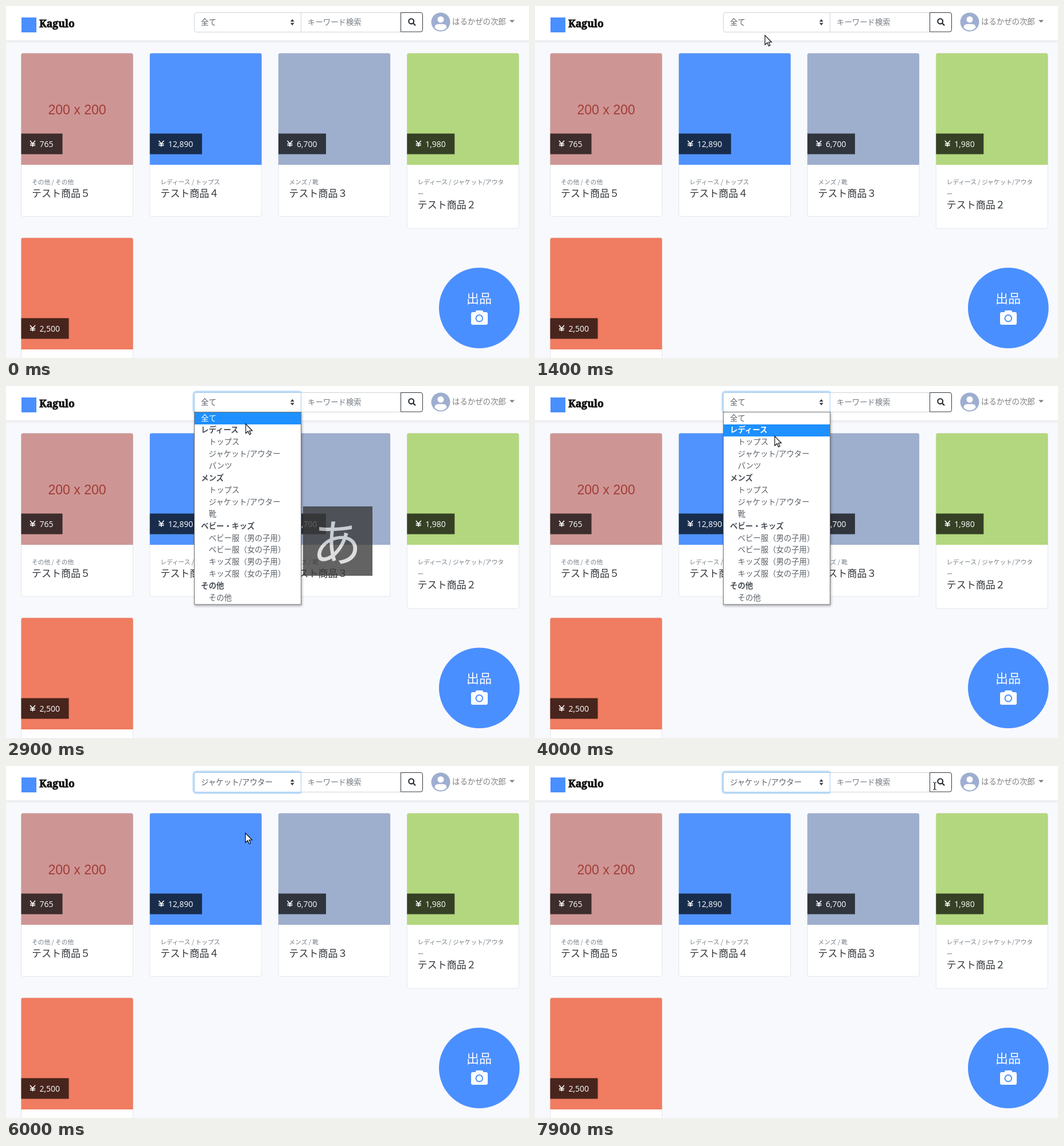
An HTML page that plays this animation: 912x614 px, repeating every 8000 ms.

```html
<!DOCTYPE html>
<html lang="ja">
<head>
<meta charset="utf-8">
<title>Shop search</title>
<style>
  html, body { margin: 0; width: 100%; height: 100%; overflow: hidden; background: #f8f9fd; }
  svg { display: block; }
  text { font-family: "Noto Sans CJK JP", "Noto Sans CJK", sans-serif; font-weight: 300; white-space: pre; }
  .ui { font-size: 13.4px; fill: #5a6067; }
  .group { font-weight: 700; fill: #495057; }
  .muted { fill: #757d84; }
  .category { font-size: 10.7px; fill: #757d84; }
  .title { font-size: 17px; fill: #32363a; }
  .price { font: 400 14px "Open Sans", sans-serif; fill: #fff; }
  .size { font: 23px "Liberation Sans", sans-serif; fill: #a43c36; }
  .brand { font: 900 17.5px "Noto Serif", serif; fill: #111; stroke: #111; stroke-width: .8; }
  .ime { font-size: 87px; fill: #d5d5d5; }
  .status { font: 11px "Open Sans", sans-serif; fill: #5f6368; }
</style>
</head>
<body>
<script>
const LOOP = 8000, STEP = 100, ROW = 20.9, MENU_TOP = 46;
const OPEN = 2300, CLOSE = 5900;

const cards = [
  { x: 26.5, y: 82.5, h: 284.5, color: '#cd9695', price: '765', tag: 72, category: ['その他 / その他'], title: 'テスト商品５' },
  { x: 250.8, y: 82.5, h: 284.5, color: '#5093ff', price: '12,890', tag: 91, category: ['レディース / トップス'], title: 'テスト商品４' },
  { x: 475, y: 82.5, h: 284.5, color: '#9eaecd', price: '6,700', tag: 83, category: ['メンズ / 靴'], title: 'テスト商品３' },
  { x: 699.3, y: 82.5, h: 305.5, color: '#b3d77e', price: '1,980', tag: 83, category: ['レディース / ジャケット/アウタ', 'ー'], title: 'テスト商品２' },
  { x: 26.5, y: 404.5, h: 284.5, color: '#f07c61', price: '2,500', tag: 83, category: [], title: '' },
];

// A leading * marks a group heading.
const options = ['全て', '*レディース', 'トップス', 'ジャケット/アウター', 'パンツ', '*メンズ', 'トップス',
  'ジャケット/アウター', '靴', '*ベビー・キッズ', 'ベビー服（男の子用）', 'ベビー服（女の子用）',
  'キッズ服（男の子用）', 'キッズ服（女の子用）', '*その他', 'その他'];

const text = (x, y, cls, content, extra = '') => `<text x="${x}" y="${y}" class="${cls}" ${extra}>${content}</text>`;
const rect = (x, y, w, h, fill, extra = '') => `<rect x="${x}" y="${y}" width="${w}" height="${h}" fill="${fill}" ${extra}/>`;

const yen = (x, y) => `<path d="M${x} ${y}l4.5 5l4.5 -5m-4.5 5v5.5m-4.5 -5h9m-9 2.8h9" fill="none" stroke="#fff" stroke-width="1.6"/>`;

function card({ x, y, h, color, price, tag, category, title }) {
  const lines = category.map((line, i) => text(x + 18.5, y + 228.5 + i * ROW, 'category', line)).join('');
  const titleY = y + 250 + (category.length - 1) * ROW;
  return `<g>
    ${rect(x, y, 195, h, '#fff', 'rx="3" stroke="#e3e5e9"')}
    <path d="M${x} ${y + 194.5}v-191.5q0 -3 3 -3h189q3 0 3 3v191.5z" fill="${color}"/>
    ${rect(x, y + 140, tag, 36, '#000', 'opacity=".7"')}
    ${yen(x + 15.5, y + 152.5)}
    ${text(x + 32, y + 163, 'price', price)}
    ${lines}${text(x + 18.5, titleY, 'title', title)}
  </g>`;
}

function header() {
  return `
    ${rect(-10, -10, 932, 70, '#fff', 'filter="url(#soft)"')}
    ${rect(27, 20, 26, 26, '#4a8fff')}
    ${text(58, 36.5, 'brand', 'Kagulo')}
    ${rect(326.8, 9.8, 189.4, 37.4, 'none', 'id="ring" rx="5" stroke="#bfdcf5" stroke-width="3"')}
    <path d="M514.5 11.5h174v34h-174z" fill="#fff" stroke="#ced4da"/>
    <path id="select" d="M514.5 11.5h-182.5q-3.5 0 -3.5 3.5v27q0 3.5 3.5 3.5h182.5z" fill="#fff"/>
    <path d="M495.8 27.2l3.5 -4.2l3.5 4.2zm0 2.3l3.5 4.2l3.5 -4.2z" fill="#343a40"/>
    ${text(340, 33, 'ui', '', 'id="choice"')}
    ${text(526, 33, 'ui muted', 'キーワード検索')}
    <path d="M688.5 11.5h34.5q3.5 0 3.5 3.5v26.5q0 3.5 -3.5 3.5h-34.5z" fill="#fff" stroke="#343a40"/>
    <g fill="none" stroke="#23272b" stroke-width="2.1"><circle cx="706.7" cy="26.7" r="4.4"/><path d="M710 30l4 4"/></g>
    <circle cx="758" cy="28" r="16.5" fill="#9eaed0"/>
    <path d="M747.5 37.5q0 -6 6.5 -6h8q6.5 0 6.5 6a13.5 13.5 0 0 1 -21 0z" fill="#fff"/>
    <circle cx="758" cy="23.5" r="5.5" fill="#fff"/>
    ${text(778, 31.8, 'ui', 'はるかぜの次郎', 'style="fill:#7f7f7f"')}
    <path d="M878 24.5h9l-4.5 4.5z" fill="#7f7f7f"/>`;
}

function sellButton() {
  return `
    <circle cx="825.3" cy="526.8" r="70.3" fill="#4a8fff"/>
    ${text(803, 517.5, 'ui', '出品', 'style="font-size:22px;fill:#fff"')}
    <path d="M814 534h4.5l1.5 -3h11l1.5 3h4.5q3 0 3 3v16q0 3 -3 3h-23q-3 0 -3 -3v-16q0 -3 3 -3z" fill="#fff"/>
    <circle cx="825.3" cy="544.8" r="5.8" fill="none" stroke="#4a8fff" stroke-width="2"/>`;
}

function menu() {
  const items = options.map((label, i) => {
    const group = label[0] === '*';
    const inset = group || i === 0 ? 340 : 353.5;
    return text(inset, 60.5 + i * ROW, group ? 'ui group' : 'ui', label.replace('*', ''));
  }).join('');
  return `<g id="menu">
    ${rect(328.5, 45.5, 186, 335.5, '#fff', 'stroke="#777" filter="url(#drop)"')}
    ${rect(329, 0, 185, 21, '#1e90ff', 'id="highlight"')}
    ${items}
  </g>`;
}

document.body.innerHTML = `<svg width="912" height="614" viewBox="0 0 912 614">
  <defs>
    <filter id="soft" x="-5%" y="-20%" width="110%" height="140%"><feDropShadow dx="0" dy="2" stdDeviation="2" flood-opacity=".08"/></filter>
    <filter id="drop"><feDropShadow dx="1" dy="2" stdDeviation="2" flood-opacity=".35"/></filter>
  </defs>
  ${rect(0, 0, 912, 614, '#f8f9fd')}
  ${cards.map(card).join('')}
  ${text(124, 188.5, 'size', '200 x 200', 'text-anchor="middle"')}
  ${header()}
  ${sellButton()}
  <g id="ime">${rect(518, 210, 121, 121, '#383838')}${text(533.5, 305.5, 'ime', 'あ')}</g>
  ${menu()}
  <g id="status">
    ${rect(-4, 604, 128.5, 20, '#dee1e6', 'rx="3" stroke="#cfd2d6"')}
    ${text(-2, 618.5, 'status', '192.168.99.100/items/3')}
  </g>
  <path id="arrow" d="M0 0V16.5L4 13L6.5 18.8L9 17.7L6.5 12H11.5Z" fill="#fff" stroke="#000" stroke-width="1.1"/>
  <path id="beam" d="M-3 -6.5q3 0 3 2v9q0 2 -3 2M3 -6.5q-3 0 -3 2v9q0 2 3 2" fill="none" stroke="#111"/>
</svg>`;

// Rows of [time, ...values], blended linearly.
const pointerPath = [
  [100, 898, 606], [500, 640, 300], [900, 460, 105], [1400, 401, 51], [1800, 410, 33], [2100, 413, 29],
  [2400, 413, 30], [2900, 418, 66], [3200, 418, 66], [4000, 418, 87.5], [4300, 418, 90],
  [5100, 417.5, 116.5], [6000, 417.5, 117], [6300, 440, 104], [6700, 526, 53],
  [7000, 566, 38], [7400, 636, 33], [7900, 697, 35],
];
const imeFade = [[2500, 0], [2600, .78], [2900, .78], [3300, 0]];
const statusFade = [[6200, 0], [6300, 1], [6600, 1], [6700, .85], [6900, 0]];

function sample(table, t) {
  const next = table.findIndex(row => row[0] > t);
  if (next === 0) return table[0].slice(1);
  if (next < 0) return table[table.length - 1].slice(1);
  const a = table[next - 1], b = table[next], k = (t - a[0]) / (b[0] - a[0]);
  return a.slice(1).map((v, i) => v + (b[i + 1] - v) * k);
}

const part = id => document.getElementById(id);
const [ring, select, choice, ime, menuEl, highlight, status, arrow, beam] =
  ['ring', 'select', 'choice', 'ime', 'menu', 'highlight', 'status', 'arrow', 'beam'].map(part);
const labels = [...menuEl.querySelectorAll('text')];
const show = (el, on) => el.setAttribute('display', on ? 'inline' : 'none');

function draw(t) {
  const [x, y] = sample(pointerPath, t);
  const focused = t >= OPEN, open = focused && t < CLOSE;
  const typing = x > 514 && y < 45;

  show(ring, focused);
  select.setAttribute('stroke', focused ? '#a1cbef' : '#ced4da');
  choice.textContent = options[t < CLOSE ? 0 : 3];

  show(menuEl, open);
  const active = Math.max(0, Math.floor((y - MENU_TOP) / ROW));
  highlight.setAttribute('y', Math.round(MENU_TOP + active * ROW));
  labels.forEach((label, i) => label.style.fill = i === active ? '#fff' : '');

  ime.setAttribute('opacity', sample(imeFade, t)[0]);
  status.setAttribute('opacity', sample(statusFade, t)[0]);

  show(arrow, t >= 100 && !typing);
  show(beam, typing);
  for (const el of [arrow, beam]) el.setAttribute('transform', `translate(${x} ${y})`);
}

const start = performance.now();
function tick() {
  const t = (performance.now() - start) % LOOP;
  draw(Math.floor(t / STEP) * STEP);
  requestAnimationFrame(tick);
}
tick();
</script>
</body>
</html>
```
